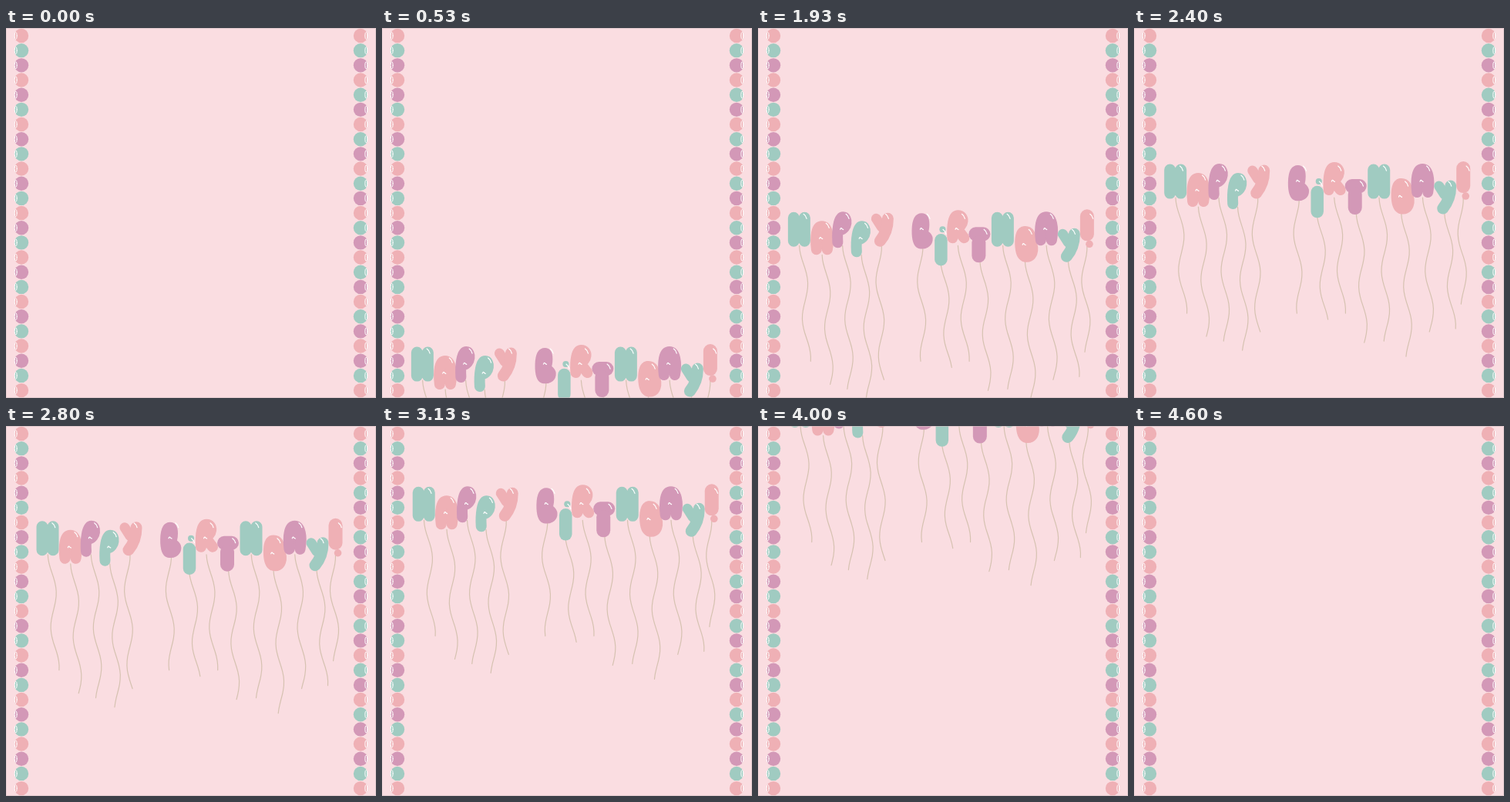
An HTML page that plays this animation: 480 by 480 pixels, repeating every 4670 ms.

```html
<!DOCTYPE html>
<html lang="en">
<head>
<meta charset="utf-8">
<title>Happy Birthday balloons</title>
<style>
html, body { margin: 0; width: 100%; height: 100%; overflow: hidden; background: #fadde1; }
svg { display: block; width: 100vw; height: 100vh; }
</style>
</head>
<body>
<svg viewBox="0 0 480 480" xmlns="http://www.w3.org/2000/svg" fill="none" stroke-linecap="round" stroke-linejoin="round">
  <rect width="480" height="480" fill="#fadde1"/>
  <g id="beads"></g>
  <g id="balloons"></g>
  <rect x=".5" y=".5" width="479" height="479" stroke="#ccb9bd" stroke-opacity=".6"/>
</svg>
<script>
const LOOP = 4670, STEP = 1000 / 15;
const PINK = '#efb0b5', TEAL = '#a0cbc1', PLUM = '#d398b7';
const COLORS = [TEAL, PINK, PLUM];

// Each letter: its advance, then thick rounded strokes as [width, path]
const GLYPHS = {
  H: [30.5, [15, 'M8 8V38M22 8V38']],
  A: [28.5, [14, 'M7 37C5 20 7 7 14 7S24 20 21 37']],
  P: [24.5, [14, 'M6 40C5 25 7 7 13 7C19 7 19 22 9 24']],
  Y: [28, [13, 'M7 9L14 20'], [15, 'M22 9Q22 26 12 38']],
  B: [29, [14, 'M13 9C5 9 6 39 11 41C22 43 24 31 13 30C17 22 17 9 13 9']],
  i: [17, [8, 'M11 3h.1'], [16.5, 'M9 17V42']],
  R: [28, [14, 'M7 34C6 18 8 5 14 5C23 5 22 19 12 21L22 34']],
  T: [29, [18, 'M9 9H19'], [18, 'M13 20V37']],
  D: [27, [16, 'M12 7C7 9 7 34 13 37C22 40 25 29 20 19C21 11 18 6 12 7']],
  '!': [21, [18, 'M10.500 6V29'], [9.5, 'M13.500 42h.1']]
};
const HOLED = 'APBRD';

// dip: drop of every second letter; bends: first turn of each string
const WORDS = [
  { text: 'HAPPY', x: 39, dip: 12, bends: '>>>><' },
  { text: 'BiRTHDAY!', x: 200, dip: 20, bends: '<>>>>>>><' }
];

function stringPath(x, y, length, bend) {
  let d = `M${x} ${y}`;
  for (let s = 6; s <= length; s += 6) {
    const dx = 4.5 * bend * (1 - Math.cos(s / 15.3)) + 6 * s / length;
    d += `L${(x + dx).toFixed(1)} ${y + s}`;
  }
  return d;
}

function balloon(char, x, y, i, bend) {
  const [width, ...blobs] = GLYPHS[char];
  const color = COLORS[i % 3];
  const length = 168 + 25 * Math.sin(0.9 * i - 0.8);
  const body = blobs.map(([w, d]) => `<path d="${d}" fill="${color}" stroke="${color}" stroke-width="${w}"/>`).join('');
  const hole = HOLED.includes(char) ? `M${width * 0.38} 23q1 -3 2.500 -.5l1.500 .8` : '';
  return `<g transform="translate(${x} ${y})">
    <path d="${stringPath(width / 2, 44, length, bend)}" stroke="#d6c2b1" stroke-width="1.2"/>
    ${body}
    <path d="M${width * 0.68} 3q3 2 4 6${hole}" stroke="#fff" stroke-width="1.2"/>
  </g>`;
}

function row() {
  let out = '', i = 0;
  for (const { text, x, dip, bends } of WORDS) {
    let left = x;
    [...text].forEach((char, k) => {
      out += balloon(char, left, 121 + k % 2 * dip, i++, bends[k] === '>' ? 1 : -1);
      left += GLYPHS[char][0];
    });
  }
  return out;
}

// The second half of the colour order reverses after `flip` beads
function beads(x, side, flip) {
  let out = '';
  for (let i = 0; i < 25; i++) {
    const order = i < flip ? [PINK, TEAL, PLUM] : [PINK, PLUM, TEAL];
    const y = 10 + i * 19.17;
    out += `<circle cx="${x}" cy="${y}" r="9.2" fill="${order[i % 3]}"/>
      <ellipse cx="${x + side * 7.3}" cy="${y}" rx="1.5" ry="4.600" stroke="#fff"/>`;
  }
  return out;
}

// Steady climb with a quicker entrance and an accelerating exit
function rise(t) {
  const entrance = 12 * Math.sin(Math.PI * Math.min(t, 1200) / 1200);
  const exit = 50 * (Math.max(0, t - 3730) / 540) ** 3;
  return 375 - 0.1333 * t - entrance - exit;
}

const stage = document.getElementById('balloons');
const letters = row();
document.getElementById('beads').innerHTML = beads(20, -1, 3) + beads(460, 1, 21);

function render(ms) {
  const t = Math.floor((ms % LOOP + 5) / STEP) * STEP;
  const drift = (t - 2800) / 1400;
  stage.innerHTML = `<g transform="translate(${drift} ${rise(t)})">${letters}</g>`;
}

function tick() {
  render(performance.now());
  requestAnimationFrame(tick);
}
tick();
</script>
</body>
</html>
```
